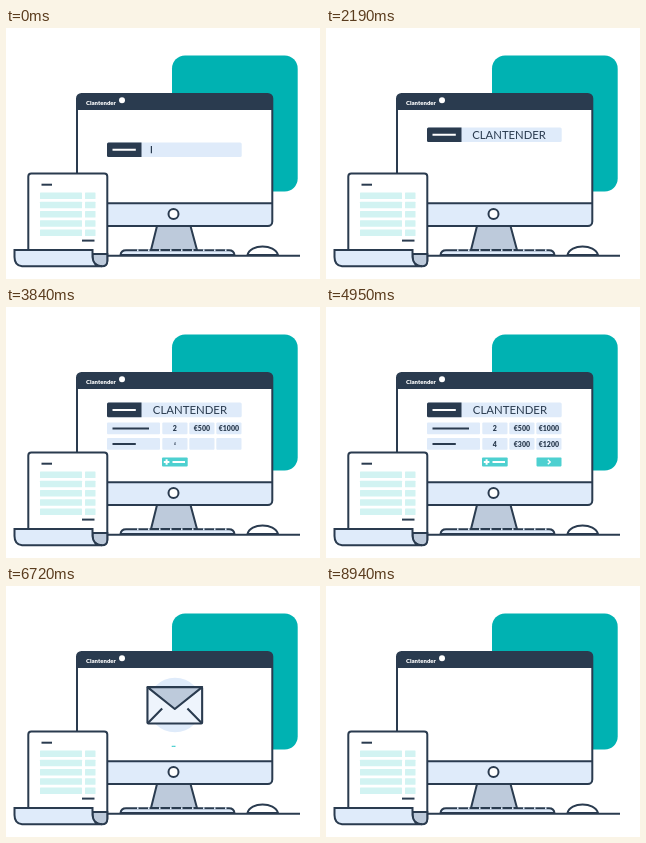
Write an HTML page with a canvas that moves like this. It is 314x251 px and loops after 9.03 s.

```html
<!DOCTYPE html>
<html lang="en">
<head>
<meta charset="utf-8">
<title>Quote to mail</title>
<style>
  html, body { margin: 0; width: 314px; height: 251px; overflow: hidden; background: #fff; }
  canvas { display: block; }
</style>
</head>
<body>
<canvas id="stage" width="314" height="251"></canvas>
<script>
const ctx = document.getElementById('stage').getContext('2d');
const LOOP = 9030;
const NAVY = '#2a3b4f', TEAL = '#00b2b2', MINT = '#4dd0d0', PALE = '#dfebfa', STEEL = '#bdcadb', FOAM = '#d2f3f2';
const BRAND = 'Clantender';

const clamp = v => Math.min(1, Math.max(0, v));
const span = (t, start, length) => clamp((t - start) / length);
const backOut = (p, s = 1.70158) => 1 + (s + 1) * (p - 1) ** 3 + s * (p - 1) ** 2;
const backIn = p => 1 - backOut(1 - p);
const mix = (a, b, p) => a + (b - a) * p;

function box(x, y, w, h, r, fill, stroke) {
  ctx.beginPath();
  ctx.roundRect(x, y, w, h, r);
  paint(fill, stroke);
}

function paint(fill, stroke) {
  if (fill) { ctx.fillStyle = fill; ctx.fill(); }
  if (stroke) { ctx.strokeStyle = stroke; ctx.lineWidth = 2; ctx.stroke(); }
}

function shape(path, fill, stroke) {
  const p = new Path2D(path);
  if (fill) { ctx.fillStyle = fill; ctx.fill(p); }
  if (stroke) { ctx.strokeStyle = stroke; ctx.lineWidth = 2; ctx.stroke(p); }
}

function disc(x, y, r, fill, stroke) {
  ctx.beginPath();
  ctx.arc(x, y, r, 0, Math.PI * 2);
  paint(fill, stroke);
}

function dash(x1, x2, y, color = NAVY, width = 2) {
  ctx.beginPath();
  ctx.moveTo(x1, y);
  ctx.lineTo(x2, y);
  ctx.strokeStyle = color;
  ctx.lineWidth = width;
  ctx.stroke();
}

function label(text, x, y, font, color, align = 'left') {
  ctx.font = font + ' Lato, sans-serif';
  ctx.fillStyle = color;
  ctx.textAlign = align;
  ctx.fillText(text, x, y);
}

function scaled(cx, cy, scale, draw) {
  if (scale <= 0) return;
  ctx.save();
  ctx.translate(cx, cy);
  ctx.scale(scale, scale);
  draw();
  ctx.restore();
}

function shifted(dx, dy, alpha, draw) {
  if (alpha <= 0) return;
  ctx.save();
  ctx.translate(dx, dy);
  ctx.globalAlpha *= alpha;
  draw();
  ctx.restore();
}

function drawMonitor() {
  box(166, 27.5, 125.7, 136, 13, TEAL);
  shape('M151 198 H184.5 L191 222 H145 Z', STEEL, NAVY);
  box(71, 66, 195.3, 132, 4.5, '#fff');
  ctx.save();
  ctx.clip();
  ctx.fillStyle = NAVY;
  ctx.fillRect(70, 65, 198, 17);
  ctx.fillStyle = PALE;
  ctx.fillRect(70, 175, 198, 24);
  ctx.restore();
  dash(71, 266, 175.2);
  box(71, 66, 195.3, 132, 4.5, null, NAVY);
  disc(167.5, 186, 5, '#fff', NAVY);
  label(BRAND, 80, 77, '900 6px', '#fff');
  disc(116, 72.3, 3, '#fff');
}

function drawDesk() {
  shape('M114.5 227 Q115 222.3 120 222.3 H223 Q228 222.3 228.5 227 Z', PALE, NAVY);
  for (let x = 131; x < 222; x += 11) dash(x, x + 1.5, 222.3, PALE);
  shape('M241.5 227 C244 215.5 269 215.5 272 227 Z', '#fff', NAVY);
  dash(98, 294, 227.8);
}

function drawPaper() {
  box(22.3, 145.5, 79, 90, 3, '#fff', NAVY);
  dash(35.5, 46, 156.7);
  dash(76, 88.5, 212.6);
  for (let i = 0; i < 5; i++) {
    const y = 164.5 + i * 9.25;
    box(34, y, 42, 6.5, 0.5, FOAM);
    box(79, y, 10.5, 6.5, 0.5, FOAM);
  }
  shape('M86.5 226 H101.3 V233 Q101.3 238.3 96 238.3 Q87 238 86.5 229 Z', STEEL, NAVY);
  shape('M8.5 222 H86.5 V229 Q87 238.3 96 238.3 H16 Q8.5 237.5 8.5 229 Z', PALE, NAVY);
}

function drawField(t) {
  const rise = backOut(span(t, 2040, 720), 2.2);
  shifted(0, -18.8 * rise, 1, () => {
    box(101, 114.4, 134.7, 14.6, 1.5, PALE);
    box(101, 114.4, 34.5, 14.6, [1.5, 0, 0, 1.5], NAVY);
    dash(106.5, 129.8, 121.7, '#fff');
    const caret = t < 300 ? 1 - span(t, 60, 180)
      : span(t, 390, 180) - span(t, 660, 180);
    if (caret > 0) shifted(0, 0, caret, () => box(144.8, 118, 1.2, 7.2, 0, NAVY));
    const typed = t < 990 ? 0 : Math.floor((t - 990) / 90) + 1;
    const size = mix(11, 11.4, clamp(rise));
    label(BRAND.toUpperCase().slice(0, typed), mix(144.2, 146.8, clamp(rise)), 125.8, `400 ${size}px`, NAVY);
  });
}

function drawRow(t, y, lineEnd, values, enter, fillStart) {
  const p = span(t, enter, 570);
  shifted(0, 15.5 * (1 - backOut(p)), clamp(p * 3), () => {
    box(101, y, 53, 11.8, 1, PALE);
    dash(106.5, lineEnd, y + 6.1);
    values.forEach((value, i) => {
      const x = 156.3 + i * 27;
      box(x, y, 25.2, 11.8, 1, PALE);
      const grow = backOut(span(t, fillStart + i * 300, 300));
      scaled(x + 12.6, y + 6, grow, () => label(value, 0, 2.5, '900 7px', NAVY, 'center'));
    });
  });
}

function drawAddButton(t) {
  const p = span(t, 2310, 510);
  const drop = 15.5 * backOut(span(t, 3180, 600));
  shifted(0, mix(15.5, 0, backOut(p)) + drop - 15.5, clamp(p * 3), () => {
    box(156, 150.5, 25.7, 9, 1, MINT);
    dash(157.8, 163.4, 155, '#fff');
    box(159.6, 152.2, 2, 5.6, 0, '#fff');
    dash(166.5, 179, 155, '#fff');
  });
}

function drawNextButton(cx, cy, scale, press) {
  scaled(cx, cy + 2 * press, scale, () => {
    box(-12.5, -4.4, 25, 8.8, 0.8, MINT);
    ctx.beginPath();
    ctx.moveTo(-1.2, -2.2);
    ctx.lineTo(1.2, 0);
    ctx.lineTo(-1.2, 2.2);
    ctx.strokeStyle = '#fff';
    ctx.lineWidth = 1.4;
    ctx.stroke();
  });
}

function drawForm(t) {
  const exit = span(t, 5580, 200) ** 2;
  shifted(219 * exit, 0, 1, () => drawField(t));
  shifted(224 * exit, 0, 1, () => {
    drawRow(t, 115.4, 143, ['2', '€500', '€1000'], 2250, 2880);
    drawRow(t, 131, 129.8, ['4', '€300', '€1200'], 3180, 3810);
    drawAddButton(t);
    const press = Math.sin(Math.PI * span(t, 5190, 150));
    drawNextButton(223, 155, backOut(span(t, 4740, 210)), press);
  });
}

function popScale(t, enter, enterLength, leave) {
  return backOut(span(t, enter, enterLength)) - backIn(span(t, leave, 400));
}

function drawMail(t) {
  scaled(169, 119, popScale(t, 5880, 600, 8540), () => disc(0, 0, 27.3, PALE));
  scaled(168.8, 119.3, popScale(t, 6250, 600, 8350), () => {
    ctx.lineJoin = 'round';
    box(-26, -17.3, 52, 34.6, 1, '#eef4fc', NAVY);
    shape('M-26 17.3 L-12 3 M26 17.3 L12 3', null, NAVY);
    shape('M-26 -17.3 H26 L0 3.5 Z', STEEL, NAVY);
  });
  const press = Math.sin(Math.PI * span(t, 7500, 360));
  drawNextButton(167.6, 160.3, popScale(t, 6700, 620, 8160), press);
}

function render(t) {
  ctx.fillStyle = '#fff';
  ctx.fillRect(0, 0, 314, 251);
  drawMonitor();
  ctx.save();
  ctx.beginPath();
  ctx.rect(72, 82, 193.2, 92);
  ctx.clip();
  if (t < 5800) drawForm(t);
  else drawMail(t);
  ctx.restore();
  drawDesk();
  drawPaper();
}

const begin = performance.now();
function tick() {
  render((performance.now() - begin) % LOOP);
  requestAnimationFrame(tick);
}
tick();
</script>
</body>
</html>
```
